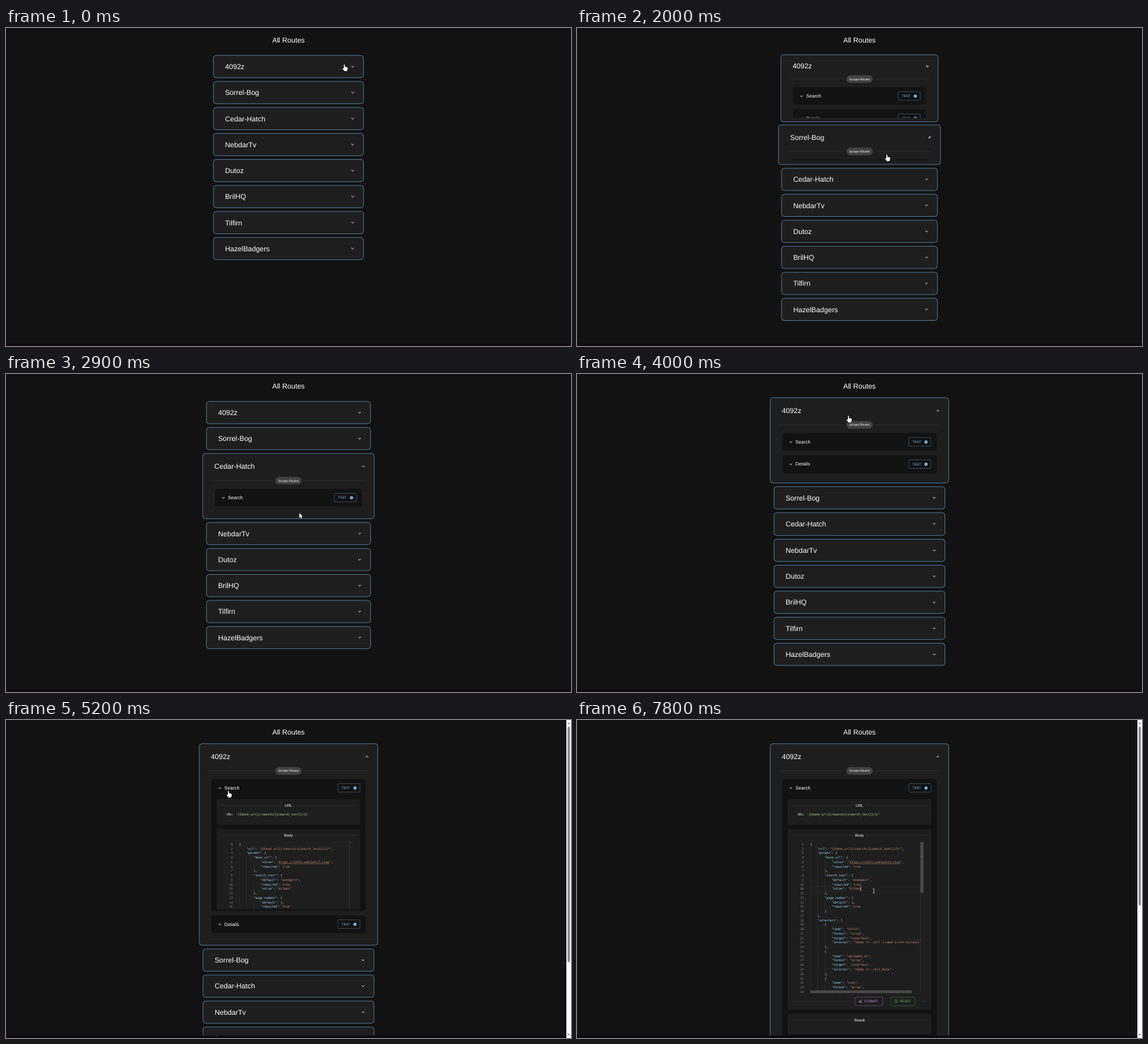
An HTML page with a canvas that plays this animation: 853 by 480 pixels, repeating every 8 s.

```html
<!DOCTYPE html>
<html lang="en">
<head>
<meta charset="utf-8">
<title>All Routes</title>
<style>
html, body { margin: 0; width: 100%; height: 100%; overflow: hidden; background: #121212; }
canvas { display: block; }
</style>
</head>
<body>
<canvas id="stage" width="853" height="480"></canvas>
<script>
const g = document.getElementById('stage').getContext('2d');
const SANS = '"Liberation Sans", Arial, sans-serif';
const MONO = '"DejaVu Sans Mono", monospace';
const LOOP = 8000, MID = 426.5;
const BLUE = '#90caf9', PANEL = '#1e1e1e', DARK = '#121212', RULE = '#343434';

const names = ['4092z', 'Sorrel-Bog', 'Cedar-Hatch', 'NebdarTv', 'Dutoz', 'BrilHQ', 'Tilfirn', 'HazelBadgers'];
const clicks = [[680, 0], [1920, 1], [2580, 2], [3771, 0]]; // time, panel opened
const searchClick = 5033, editClick = 6400, deleteKey = 7750;
const pointer = [
  [0, 512, 60, 'hand'], [250, 512, 60, 'hand'], [400, 509, 60, 'hand'], [1050, 509, 60, 'hand'],
  [1200, 505, 78, 'arrow'], [1700, 474, 177, 'hand'], [1880, 469, 196, 'hand'], [2050, 469, 196, 'hand'],
  [2400, 443, 214, 'hand'], [2650, 443, 214, 'arrow'], [2950, 443, 214, 'arrow'], [3400, 411, 77, 'arrow'],
  [3500, 411, 73, 'hand'], [3600, 411, 68, 'hand'], [4050, 411, 68, 'hand'], [4150, 395, 78, 'arrow'],
  [4320, 350, 100, 'hand'], [4500, 337, 112, 'hand'], [5350, 337, 112, 'hand'], [5450, 340, 118, 'arrow'],
  [5850, 365, 150, 'arrow'], [6000, 385, 186, 'beam'], [6400, 448, 258, 'beam'], [LOOP, 448, 258, 'beam']
];

const field = (name, selector) => ({ name, format: 'array', target: 'innerText', selector });
const path = '{{base_url}}/search/{{search_text}}/1/';
const code = JSON.stringify({
  url: path,
  params: {
    base_url: { value: 'https://1337x.unblockit.rsvp', required: true },
    search_text: { default: 'avengers', required: true, value: 'hitman' },
    page_number: { default: 1, required: true }
  },
  selectors: [
    field('title', 'tbody tr .coll-1.name a:nth-child(2)'),
    field('uploaded_on', 'tbody tr .coll-date'),
    field('size', 'tbody tr .coll-4')
  ]
}, null, 4).split('\n').slice(0, 34);

// cubic-bezier(.4, 0, .2, 1)
function ease(x) {
  if (x <= 0) return 0;
  if (x >= 1) return 1;
  let lo = 0, hi = 1, s;
  for (let i = 0; i < 18; i++) {
    s = (lo + hi) / 2;
    const r = 1 - s;
    if (1.2 * r * r * s + .6 * r * s * s + s ** 3 < x) lo = s; else hi = s;
  }
  return 3 * (1 - s) * s * s + s ** 3;
}

function text(str, x, y, size, color = '#fff', align = 'left', font = SANS) {
  g.font = `${size}px ${font}`;
  g.textAlign = align;
  g.fillStyle = color;
  g.fillText(str, x, y + size * .355);
}

function rect(x, y, w, h, r, fill, stroke, width = .8) {
  g.beginPath();
  g.roundRect(x, y, w, h, r);
  if (fill) { g.fillStyle = fill; g.fill(); }
  if (stroke) { g.strokeStyle = stroke; g.lineWidth = width; g.stroke(); }
}

function line(x1, y1, x2, y2, color = RULE, width = .6) {
  g.beginPath();
  g.moveTo(x1, y1);
  g.lineTo(x2, y2);
  g.strokeStyle = color;
  g.lineWidth = width;
  g.stroke();
}

function clipped(x, y, w, h, draw) {
  if (h <= 0) return;
  g.save();
  g.beginPath();
  g.rect(x, y, w, h);
  g.clip();
  draw();
  g.restore();
}

function chevron(x, y, turn) {
  g.save();
  g.translate(x, y);
  g.rotate(Math.PI * turn);
  g.beginPath();
  g.moveTo(-1.9, -.9);
  g.lineTo(0, .9);
  g.lineTo(1.9, -.9);
  g.strokeStyle = '#fff';
  g.lineWidth = .85;
  g.stroke();
  g.restore();
}

function button(label, x, y, w, color, edge, labelX) {
  rect(x, y - 6.5, w, 13, 1.5, null, edge, .6);
  g.letterSpacing = '.13px';
  text(label, labelX, y, 4.85, color);
  g.letterSpacing = '0px';
}

function heading(label, y) {
  line(324, y, 417, y);
  line(436, y, 529, y);
  text(label, MID, y, 5.7, '#fff', 'center');
}

function tokenColor(s) {
  if (s[0] === '"') return s.endsWith(':') ? '#9cdcfe' : '#ce9178';
  return s === 'true' ? '#ce9178' : /\d/.test(s) ? '#b5cea8' : '#dcdcdc';
}

function editor(t) {
  const cw = 2.72, x0 = 352, x1 = 518.5, top = 184, rowH = 6.755;
  const active = t < editClick ? 0 : 10;
  const deleted = t >= deleteKey;
  const rowY = i => top + 3.3 + i * rowH;

  rect(x0, rowY(active) - rowH / 2, x1 - x0, rowH, 0, null, '#2a2a2a', .7);
  code.forEach((full, i) => {
    const src = i === 10 && deleted ? full.slice(0, -1) : full;
    const y = rowY(i), indent = src.search(/\S/);
    text(i + 1, 342.3, y, 4.518, i === active ? '#d6d6d6' : '#858585', 'right', MONO);
    for (let k = 0; k < indent; k += 4)
      line(x0 + k * cw + .4, y - rowH / 2, x0 + k * cw + .4, y + rowH / 2, '#404040', .35);
    let x = x0 + indent * cw;
    for (const tok of src.trim().match(/"[^"]*"?:?|true|\d+|[^"\dt]+/g)) {
      text(tok, x, y, 4.518, tokenColor(tok), 'left', MONO);
      if (tok.startsWith('"http'))
        line(x + cw, y + 2.7, x + cw * (tok.length - 1), y + 2.7, '#ce9178', .45);
      x += tok.length * cw;
    }
    const on = deleted || Math.floor((t - editClick) / 500) % 2 === 0;
    if (i === 10 && t >= editClick && on) rect(x - .2, y - 3.3, .8, 6.6, 0, '#c8c8c8');
  });

  line(x1, top, x1, 412.5, '#3a3a3a', .5);
  if (t > 5950) {
    rect(x1, top, 4.7, 76.5, 0, '#4a4a4a');
    rect(x0, 408.4, 153.5, 4.2, 0, '#4a4a4a');
  }
  const mark = active ? 206.3 : 184.4;
  line(x1, mark, 523.2, mark, '#6a6a6a', .5);
}

function formatButtons() {
  const y = 424.8;
  line(324, y, 412, y);
  line(466.8, y - 3, 466.8, y + 3);
  line(520, y, 529, y);
  button('FORMAT', 419.7, y, 41.8, '#ce93d8', '#7a5a80', 433.7);
  button('RESET', 473.3, y, 37, '#66bb6a', '#426f45', 487.4);
  g.fillStyle = '#ce93d8';
  for (const [x, dy, s] of [[427.3, .3, 2.5], [430.1, -1.8, 1.1], [430.1, 1.9, 1.1]]) {
    g.beginPath();
    for (let k = 0; k < 8; k++) {
      const r = k % 2 ? s * .35 : s, a = k * Math.PI / 4;
      g.lineTo(x + r * Math.cos(a), y + dy + r * Math.sin(a));
    }
    g.fill();
  }
  g.beginPath();
  g.arc(481.3, y, 2.3, -2.7, 2.9);
  g.moveTo(481.3, y - 1.3);
  g.lineTo(481.3, y + .2);
  g.lineTo(482.3, y + .8);
  g.strokeStyle = '#66bb6a';
  g.lineWidth = .65;
  g.stroke();
}

function searchDetails(t) {
  rect(318, 119.5, 217, 39, 2.5, PANEL);
  heading('URL', 129);
  text('URL: ', 333, 142.6, 4.63, '#f0f0f0', 'left', MONO);
  text(`'${path}'`, 347, 142.6, 4.63, '#c9e89a', 'left', MONO);
  rect(318, 164.5, 217, 272.5, 2.5, PANEL);
  heading('Body', 174);
  clipped(330, 184, 193.3, 228.6, () => editor(t));
  formatButtons();
  rect(318, 443.5, 217, 31, 2.5, PANEL);
  heading('Result', 452.7);
}

function routeRow(label, x, y, w, extra, turn, t) {
  const right = x + w, mid = y + 13.7;
  rect(x, y, w, 27.4 + extra, 3.5, DARK, '#242424', .5);
  chevron(x + 13, mid + .3, turn);
  text(label, x + 20, mid - .2, 7.2);
  button('TEST', right - 42.3, mid, 33.4, BLUE, '#4c6a82', right - 36.6);
  g.fillStyle = BLUE;
  g.beginPath();
  g.arc(right - 16.3, mid + .2, 2.4, 0, 7);
  g.fill();
  g.fillStyle = '#40617c';
  g.beginPath();
  g.arc(right - 16.3, mid + .2, .85, 0, 7);
  g.fill();
  if (extra > 0) clipped(x, y, w, 24.4 + extra, () => {
    g.translate(0, y - 88.8);
    searchDetails(t);
  });
}

function openness(i, t, dur) {
  return clicks.reduce((sum, [at, panel], k) => {
    if (panel !== i) return sum;
    const end = clicks[k + 1];
    return sum + ease((t - at) / dur) - (end ? ease((t - end[0]) / dur) : 0);
  }, 0);
}

// Draws the accordion list and returns the page height.
function panels(t) {
  const left = 313.2 - 5.25 * clicks.slice(1).reduce((s, [at]) => s + ease((t - at) / 150), 0);
  const extraAll = 371 * ease((t - searchClick) / 500);
  const gap = 5.65;
  let y = 35.75, last = 0;
  names.forEach((name, i) => {
    const rows = i ? ['Search'] : ['Search', 'Details'];
    const open = openness(i, t, 150), grow = 5.4 * open;
    const body = openness(i, t, i ? 270 : 301) * (26 + 33.5 * rows.length);
    const extra = i ? 0 : extraAll;
    const margin = gap * (1 - open);
    y += Math.max(last, margin);
    last = margin;
    const x = left - gap * open, w = 2 * (MID - x), h = 33.6 + grow + body + extra;
    rect(x, y, w, h, 4, PANEL, '#5d88aa');
    text(name, x + 17.5, y + 16.8 + grow / 2, 10.75);
    chevron(x + w - 16.4, y + 16.8 + grow / 2, open);
    if (body > .1) clipped(x, y, w, h - 6, () => {
      const rule = y + 35.6 + grow;
      line(x + 12.5, rule, 403, rule);
      line(450, rule, x + w - 12.5, rule);
      rect(406.6, rule - 5.7, 39.8, 11.4, 5.7, '#424242');
      text('Scrape Routes', MID, rule, 4.75, '#fff', 'center');
      rows.forEach((label, j) => routeRow(label, x + 18, y + 47.6 + grow + j * (33.5 + extra), w - 36,
        j ? 0 : extra, j || i ? 0 : ease((t - searchClick) / 150), t));
    });
    y += h;
  });
  return y + last + 6;
}

function scrollbar(pageHeight) {
  if (pageHeight <= 480) return;
  rect(846, 0, 7, 480, 0, '#fcfcfc');
  rect(847.8, 10, 3.6, 464 * 480 / pageHeight, 1.8, '#8b8b8b');
  g.fillStyle = '#8b8b8b';
  for (const [y, d] of [[5, 1], [475, -1]]) {
    g.beginPath();
    g.moveTo(849.6, y - 1.4 * d);
    g.lineTo(851.6, y + 1.2 * d);
    g.lineTo(847.6, y + 1.2 * d);
    g.fill();
  }
}

const shapes = {
  hand: new Path2D('M-2-4.2q0-.9.75-.9t.75.9V-1.4q1.8 0 3.8.8.7.3.6 1.2l-.5 2.6-.7 1.7h-3.8L-3.7 1.7Q-4.1.9-3.4.6T-2 1.5Z'),
  arrow: new Path2D('M-.2-4.2V3.3L1.5 1.8 2.7 4.4 3.9 3.8 2.7 1.3H5Z'),
  beam: new Path2D('M-1.4-3.2Q0-3.2 0-2.6Q0-3.2 1.4-3.2M0-2.8V2.8M-1.4 3.2Q0 3.2 0 2.6Q0 3.2 1.4 3.2')
};

function drawPointer(t) {
  const k = pointer.findIndex(p => p[0] > t);
  const [t0, x0, y0, kind] = pointer[k - 1], [t1, x1, y1] = pointer[k];
  const f = (t - t0) / (t1 - t0);
  g.save();
  g.translate(x0 + (x1 - x0) * f, y0 + (y1 - y0) * f);
  g.strokeStyle = kind === 'beam' ? '#d8d8d8' : '#000';
  g.lineWidth = .7;
  g.stroke(shapes[kind]);
  if (kind !== 'beam') {
    g.fillStyle = '#fff';
    g.fill(shapes[kind]);
  }
  g.restore();
}

function frame() {
  const t = performance.now() % LOOP;
  g.textRendering = 'geometricPrecision';
  rect(0, 0, 853, 480, 0, DARK);
  text('All Routes', MID, 18, 10.75, '#fff', 'center');
  const height = panels(t);
  rect(0, 476.3, 853, 3.7, 0, '#0f0a0c');
  scrollbar(height);
  drawPointer(t);
  requestAnimationFrame(frame);
}
frame();
</script>
</body>
</html>
```
